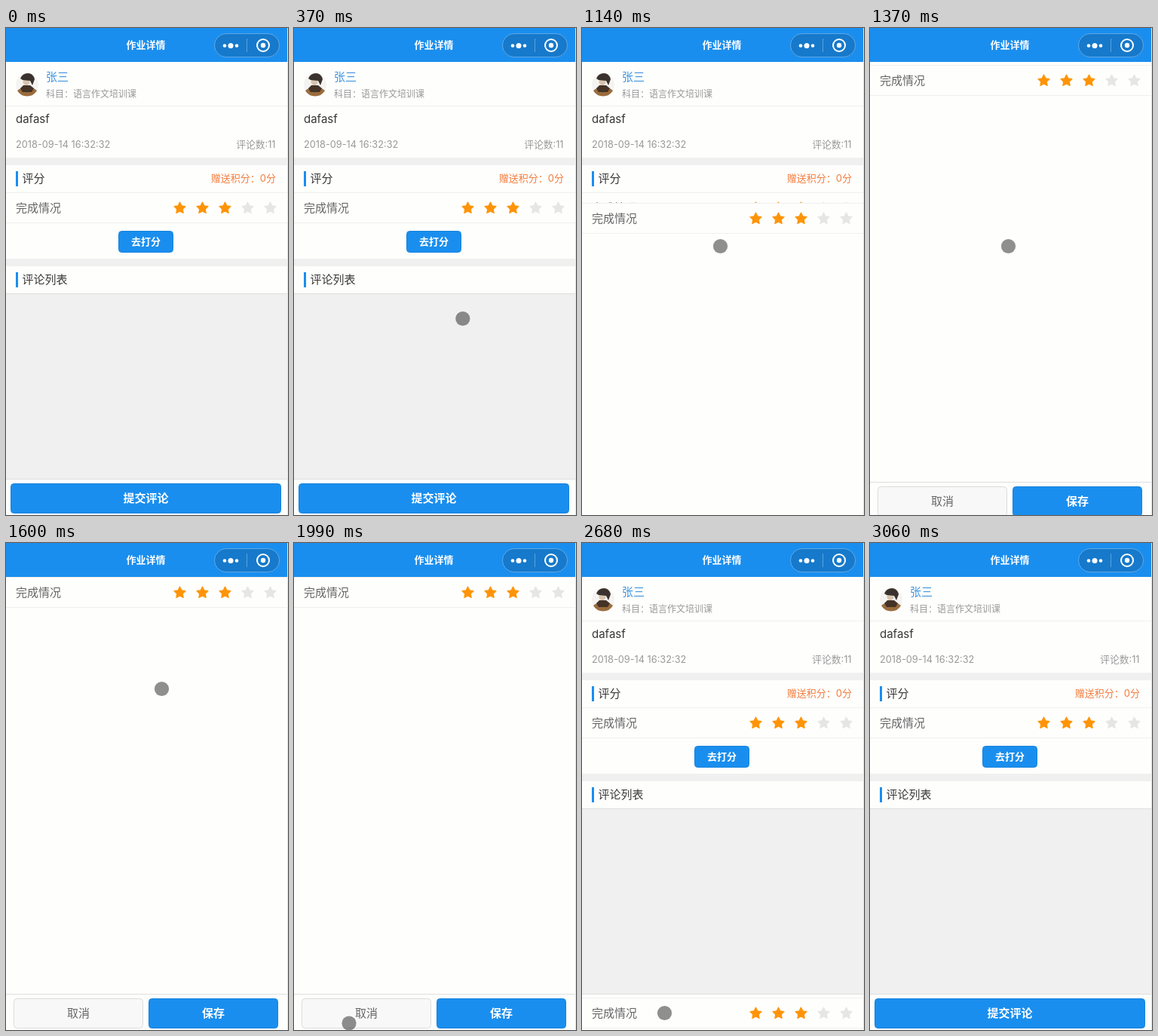
An HTML page that plays this animation: 374 by 646 pixels, repeating every 3.62 s.

```html
<!DOCTYPE html>
<html lang="zh-CN">
<head>
<meta charset="utf-8">
<title>作业详情</title>
<style>
  html, body { margin: 0; width: 100%; height: 100%; overflow: hidden; background: #fefefd; }
  svg { display: block; width: 100%; height: 100%; }
  text { font-family: Inter, "Noto Sans CJK SC", "Noto Sans CJK", sans-serif; }
</style>
</head>
<body>
<svg id="stage" viewBox="0 0 374 646"></svg>
<script>
const BLUE = '#1a8eee', PAPER = '#fefefd', GAP = '#f0f0f0', EDGE = '#dedede';
const LOOP = 3620, TICK = 76.9, LAG = 6.2;
const SLIDE = 475, OPEN_AT = 955, CLOSE_AT = 2366, TRAVEL = 601;

const rect = (x, y, w, h, fill, extra = '') =>
  `<rect x="${x}" y="${y}" width="${w}" height="${h}" fill="${fill}" ${extra}/>`;
const circle = (x, y, r, fill, extra = '') =>
  `<circle cx="${x}" cy="${y}" r="${r}" fill="${fill}" ${extra}/>`;
const line = (y, color = '#f0f0f0') => rect(0, y, 373, 1, color);

// y is the vertical middle of the glyphs; the baseline sits on a whole pixel
const text = (str, x, y, size, fill, anchor = 'start', weight = 400) =>
  `<text x="${x}" y="${Math.floor(y + size * 0.38)}" font-size="${size}" fill="${fill}" text-anchor="${anchor}" font-weight="${weight}">${str}</text>`;

const button = (label, x, y, w, h, size, fill = BLUE, border = '#1783dc', color = '#fff', id = '') =>
  rect(x + 0.5, y + 0.5, w - 1, h - 1, fill, `rx="4" stroke="${border}" id="${id}"`) +
  text(label, x + w / 2, y + h / 2, size, color, 'middle', color === '#fff' ? 700 : 400);

function star(cx, cy, color) {
  const points = Array.from({ length: 10 }, (_, i) => {
    const r = i % 2 ? 4 : 7.9, a = i * Math.PI / 5;
    return `${(cx + r * Math.sin(a)).toFixed(2)},${(cy - r * Math.cos(a)).toFixed(2)}`;
  }).join(' ');
  return `<polygon points="${points}" fill="${color}" stroke="${color}" stroke-width="1.2" stroke-linejoin="round"/>`;
}

const ratingRow = y => text('完成情况', 13, y, 15, '#666') +
  [0, 1, 2, 3, 4].map(i => star(230.5 + 30 * i, y + 0.5, i < 3 ? '#ff9408' : '#e6e6e6')).join('');

const heading = (label, y) => rect(13, y - 10, 3, 20, BLUE) + text(label, 21.5, y, 15, '#383838');

const avatar = circle(28, 75, 15, '#f5f4f2') +
  '<path d="M15 83q6-5 13-5t13 5a15 15 0 0 1-26 0z" fill="#9a6c3c"/>' +
  '<path d="M19 80l4-4h9l5 4-3 5H22z" fill="#453328"/>' +
  circle(27, 71.5, 4.5, '#d9c4ae') +
  '<path d="M19 67q3-7 10-7t9 8l-3 8-3-6-10-1z" fill="#3b322e"/>';

const page = rect(0, 45, 373, 601, GAP) +
  rect(0, 45, 373, 127, PAPER) + avatar +
  text('张三', 53, 65, 15, '#3d93de') +
  text('科目：语言作文培训课', 53, 87.5, 12, '#999') +
  line(103) +
  text('dafasf', 13, 120.5, 15, '#383838') +
  text('2018-09-14 16:32:32', 13, 155, 12.75, '#999') +
  text('评论数:11', 357.5, 155, 12.75, '#999', 'end') +
  rect(0, 182, 373, 124, PAPER) +
  heading('评分', 200) +
  text('赠送积分：0分', 358, 200, 13, '#f47c3c', 'end') +
  line(218) + ratingRow(238.5) + line(258) +
  button('去打分', 149, 269, 73, 29, 13) +
  rect(0, 316, 373, 36, PAPER) + heading('评论列表', 334) + line(352, EDGE) +
  rect(0, 598, 373, 48, PAPER) + line(598, EDGE) +
  button('提交评论', 6, 604, 359, 40, 15);

const sheet = rect(0, 45, 373, 601, PAPER) + line(45) +
  ratingRow(65.5) + line(85) + line(598, EDGE) +
  button('取消', 10, 604, 172, 40, 15, '#f8f8f8', '#dcdcdc', '#666', 'cancel') +
  button('保存', 189, 604, 172, 40, 15);

const header = rect(0, 0, 373, 45, BLUE) +
  text('作业详情', 185.5, 22.5, 13, '#fff', 'middle', 700) +
  rect(276.5, 7.5, 86, 31, '#000', 'rx="15.5" fill-opacity=".15" stroke="#fff" stroke-opacity=".3"') +
  circle(290, 23.5, 2.3, '#fff') + circle(298, 23.5, 3.5, '#fff') + circle(306, 23.5, 2.3, '#fff') +
  rect(319, 14, 1, 18, '#fff', 'fill-opacity=".3"') +
  circle(341, 23, 8, 'none', 'stroke="#fff" stroke-width="2"') + circle(341, 23, 3.2, '#fff');

const stage = document.getElementById('stage');
stage.innerHTML = page + `<g id="sheet">${sheet}</g>` + header +
  rect(373, 0, 1, 646, '#e4e4e4') +
  `<g id="pointer">${circle(0, 0, 9.6, '#202020', 'fill-opacity=".5"')}` +
  `${circle(0, 0, 10.2, 'none', 'id="ring" stroke="#fff" stroke-opacity=".65" stroke-width="1.5"')}</g>`;
const [sheetEl, pointer, ring, cancel] =
  ['sheet', 'pointer', 'ring', 'cancel'].map(id => document.getElementById(id));

// pointer route: [tick, x, y]
const ROUTE = [
  [1, 299.5, 546.5], [4, 242, 422], [7, 187.5, 312.5], [8, 183.5, 289.5], [19, 183.5, 289.5],
  [20, 196, 238], [21, 206.5, 193.5], [22, 190, 270], [23, 145, 400], [24, 88, 530],
  [25, 46, 615], [26, 73, 637], [27, 80.5, 631.5], [33, 80.5, 631.5],
  [35, 109.5, 623.5], [36, 190, 565], [37, 255, 485.5], [38, 254, 445], [39, 253, 419]
];

function routeAt(tick) {
  const i = ROUTE.findIndex(p => p[0] >= tick);
  if (i < 0 || tick < ROUTE[0][0]) return null;
  const b = ROUTE[i], a = ROUTE[i - 1] || b;
  const f = a === b ? 1 : (tick - a[0]) / (b[0] - a[0]);
  return [a[1] + (b[1] - a[1]) * f, a[2] + (b[2] - a[2]) * f];
}

// CSS "ease" curve: cubic-bezier(.25, .1, .25, 1)
function ease(x) {
  if (x <= 0) return 0;
  if (x >= 1) return 1;
  let lo = 0, hi = 1, s;
  for (let i = 0; i < 24; i++) {
    s = (lo + hi) / 2;
    if (0.75 * s * (1 - s) + s ** 3 < x) lo = s; else hi = s;
  }
  return 0.3 * s * (1 - s) ** 2 + 3 * s * s * (1 - s) + s ** 3;
}

function draw(ms) {
  // the picture advances in 10 ms-aligned steps of about 1/13 s
  const tick = Math.floor((Math.floor(ms / 10) * 10 + 10 + LAG) / TICK);
  const time = tick * TICK - LAG;

  const open = ease((time - OPEN_AT) / SLIDE) - ease((time - CLOSE_AT) / SLIDE);
  sheetEl.setAttribute('transform', `translate(0 ${Math.round(TRAVEL * (1 - open))})`);
  cancel.setAttribute('fill', tick >= 31 ? '#dedede' : '#f8f8f8');

  const at = routeAt(tick);
  pointer.setAttribute('visibility', at ? 'visible' : 'hidden');
  if (at) pointer.setAttribute('transform', `translate(${at})`);
  const pressed = (tick >= 9 && tick <= 12) || (tick >= 27 && tick <= 31);
  ring.setAttribute('display', pressed ? 'inline' : 'none');
}

const start = performance.now();
function loop() {
  draw((performance.now() - start) % LOOP);
  requestAnimationFrame(loop);
}
loop();
</script>
</body>
</html>
```
